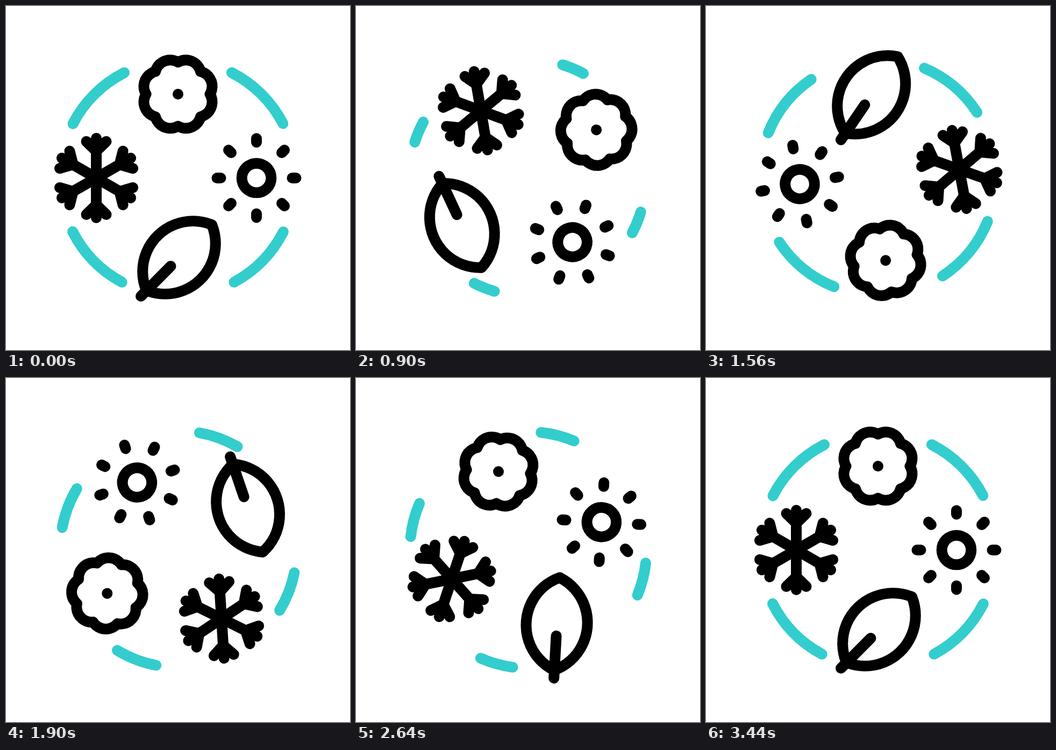
An HTML page with a canvas that plays this animation: 640 by 640 pixels, repeating every 3.6 s.

```html
<!DOCTYPE html>
<html lang="en">
<head>
<meta charset="utf-8">
<title>Four seasons</title>
<style>
  html, body { margin: 0; height: 100%; overflow: hidden; background: #fff; }
  canvas { display: block; width: 640px; height: 640px; }
</style>
</head>
<body>
<canvas width="640" height="640"></canvas>
<script>
const ctx = document.querySelector('canvas').getContext('2d');
const LOOP = 3600, STEP = 20;
const TEAL = '#33cdcd';
const rad = deg => deg * Math.PI / 180;
const smooth = s => s * s * (3 - 2 * s);

// Ease with zero speed at both ends; x1 and x2 are the handle positions in time.
function ease(x, x1, x2) {
  let lo = 0, hi = 1;
  for (let i = 0; i < 30; i++) {
    const s = (lo + hi) / 2, r = 1 - s;
    if (3 * s * r * r * x1 + 3 * s * s * r * x2 + s * s * s < x) lo = s; else hi = s;
  }
  return smooth(lo);
}

// One turn with a small wind-up and overshoot, in degrees.
function turn(n) {
  if (n < 9) return -5 * smooth(n / 9);
  if (n < 161) return -5 + 370 * ease((n - 9) / 152, 0.318, 0.583);
  return 365 - 5 * smooth(Math.min(1, (n - 161) / 11));
}

// Visible part of each arc: shrinks towards its end, then grows from its start, twice.
const trimKeys = [21.8, 58.5, 80, 113, 152.8];
function trim(n) {
  for (let i = 0; i < 4; i++) {
    if (n >= trimKeys[i] && n < trimKeys[i + 1]) {
      const e = smooth((n - trimKeys[i]) / (trimKeys[i + 1] - trimKeys[i]));
      return i % 2 ? [0, e] : [e, 1];
    }
  }
  return [0, 1];
}

function line(...points) {
  ctx.beginPath();
  for (let i = 0; i < points.length; i += 2) ctx.lineTo(points[i], points[i + 1]);
  ctx.stroke();
}

function repeat(count, draw) {
  for (let i = 0; i < count; i++) {
    draw();
    ctx.rotate(2 * Math.PI / count);
  }
}

function flower() {
  const dist = 38, r = 28.4;
  const half = Math.PI / 8, mid = dist * Math.cos(half), side = dist * Math.sin(half);
  const notch = mid + Math.sqrt(r * r - side * side);
  // Angle of a notch as seen from the centre of its petal, relative to the petal axis.
  const spread = Math.atan2(side, notch - mid) + half;
  ctx.beginPath();
  for (let i = 0; i < 8; i++) {
    const a = (2 * i + 1) * half;
    ctx.arc(dist * Math.cos(a), dist * Math.sin(a), r, a - spread, a + spread);
  }
  ctx.closePath();
  ctx.stroke();
  line(0, 0, 0, 0.01);
}

function sun() {
  ctx.beginPath();
  ctx.arc(0, 0, 27.3, 0, 2 * Math.PI);
  ctx.stroke();
  repeat(8, () => line(0, -66.5, 0, -73.5));
}

function leaf() {
  const r = 93.8, a = Math.asin(86.3 / r), axis = rad(-135), off = 26;
  ctx.beginPath();
  ctx.arc(2 + off, -2.5 + off, r, axis - a, axis + a);
  ctx.arc(2 - off, -2.5 - off, r, axis + Math.PI - a, axis + Math.PI + a);
  ctx.closePath();
  ctx.stroke();
  line(-69, 69.5, -13.5, 13.5);
}

function snowflake() {
  repeat(6, () => {
    line(0, 0, 0, -74);
    line(-18.5, -68, 0, -50, 18.5, -68);
  });
}

// Icon positions relative to the pivot.
const icons = [
  [flower, 0, -155],
  [sun, 146, 1],
  [leaf, 0, 151.5],
  [snowflake, -152, 1]
];

// Start and end of each arc, clockwise from the top.
const arcs = [[27, 62.6], [117.1, 151.7], [208.3, 243], [297.3, 333]];

function draw(n) {
  const angle = rad(turn(n));
  const [from, to] = trim(n);
  ctx.setTransform(1, 0, 0, 1, 0, 0);
  ctx.fillStyle = '#fff';
  ctx.fillRect(0, 0, 640, 640);
  ctx.lineWidth = 20;
  ctx.lineCap = ctx.lineJoin = 'round';
  ctx.translate(320, 319);
  ctx.rotate(angle);

  ctx.strokeStyle = TEAL;
  if (to - from > 0.002) {
    for (const [start, end] of arcs) {
      const at = k => rad(start + (end - start) * k - 90);
      ctx.beginPath();
      ctx.arc(0, 1, 220, at(from), at(to));
      ctx.stroke();
    }
  }

  ctx.strokeStyle = '#000';
  for (const [icon, x, y] of icons) {
    ctx.save();
    ctx.translate(x, y);
    ctx.rotate(angle);
    icon();
    ctx.restore();
  }
}

function tick() {
  draw(Math.floor(((performance.now() + 1) % LOOP) / STEP));
  requestAnimationFrame(tick);
}
tick();
</script>
</body>
</html>
```
